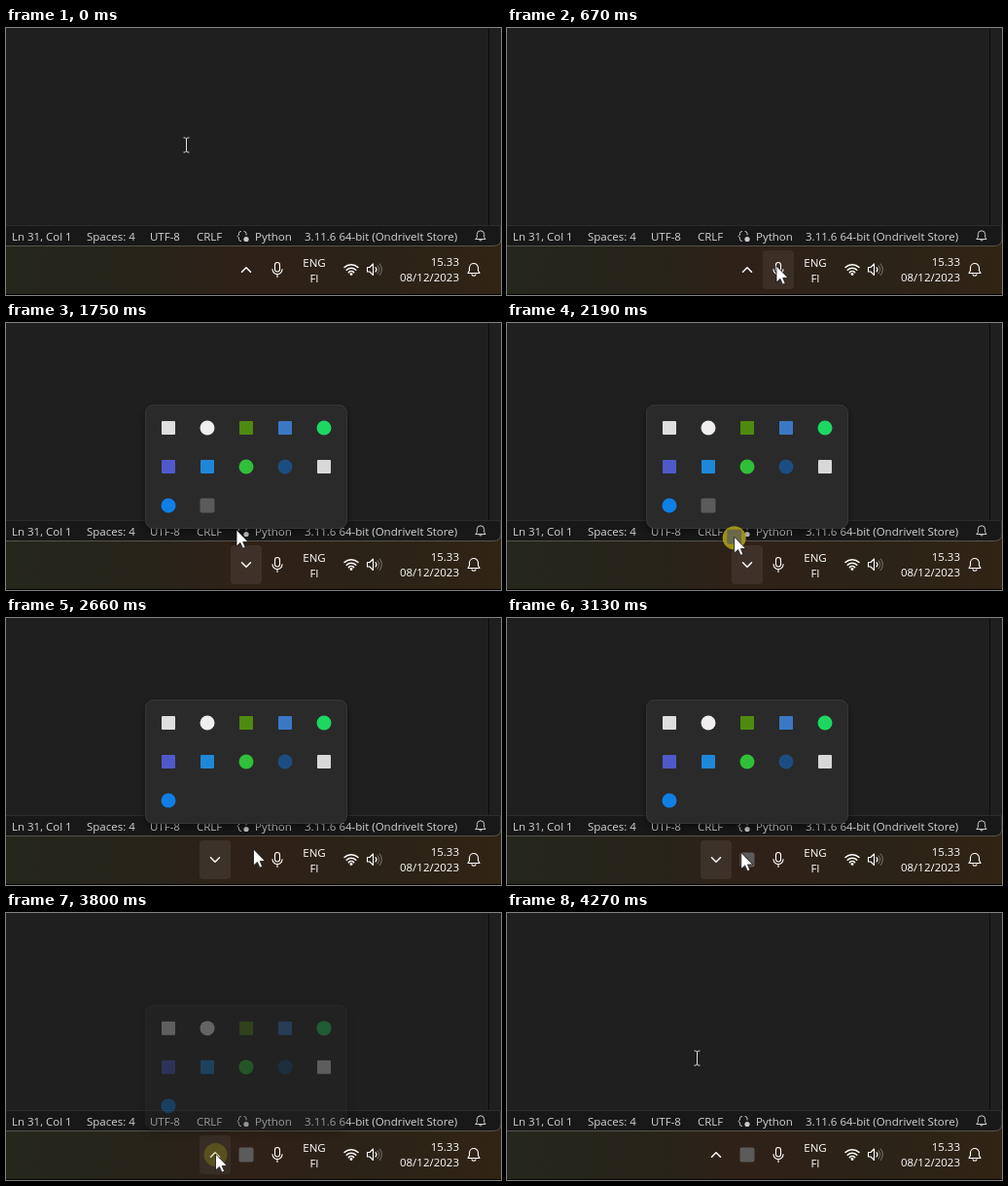
Recreate the animation shown at these times as an HTML page. Size 509 px wide and 275 px high, loop 4.47 s.

```html
<!DOCTYPE html>
<html lang="en">
<head>
<meta charset="utf-8">
<title>Tray icon</title>
<style>
  html, body { margin: 0; width: 100%; height: 100%; overflow: hidden; background: #1f1f1f; }
  svg { display: block; width: 509px; height: 275px; }
  text { font: 11.5px "Open Sans", "Noto Sans", sans-serif; fill: #d4d4d4; white-space: pre; }
  .tray text { fill: #fff; font-weight: 500; }
  .end { text-anchor: end; }
  .mid { text-anchor: middle; }
  .line { fill: none; stroke: #fff; stroke-width: 1.1; stroke-linecap: round; stroke-linejoin: round; }
  .soft { stroke: #ccc; stroke-width: 1; }
  .bold { stroke-width: 1.5; }
</style>
</head>
<body>
<svg viewBox="0 0 509 275">
  <defs>
    <linearGradient id="bar">
      <stop offset="0" stop-color="#25261c"/>
      <stop offset=".3" stop-color="#27241a"/>
      <stop offset=".48" stop-color="#2f2118"/>
      <stop offset=".75" stop-color="#2b2317"/>
      <stop offset="1" stop-color="#302414"/>
    </linearGradient>
    <filter id="shade" x="-15%" y="-15%" width="130%" height="140%">
      <feDropShadow dx="0" dy="4" stdDeviation="4" flood-color="#000" flood-opacity=".45"/>
    </filter>
    <rect id="plate" x="-16" y="-20" width="32" height="40" rx="4" stroke="#fff" stroke-opacity=".04" fill="#fff"/>
    <rect id="app" x="-7.5" y="-7.5" width="15" height="15" rx="2" fill="#5b5b5b"/>
    <path id="ibeam" d="M-3 -7.5H-1L0 -6.5L1 -7.5H3M0 -6.5V6.5M-3 7.5H-1L0 6.5L1 7.5H3"/>
  </defs>

  <!-- editor and status bar -->
  <rect width="509" height="275" fill="url(#bar)"/>
  <rect y="274" width="509" height="1" fill="#000"/>
  <path d="M-1 200H509V217Q509 224.5 501 224.5H-1Z" fill="#181818" stroke="#55544e"/>
  <rect width="509" height="203" fill="#1f1f1f"/>
  <rect x="496" width="1" height="203" fill="#0c0c0c"/>
  <rect y="203" width="509" height="1" fill="#2b2b2b"/>
  <text x="6" y="219">Ln 31, Col 1</text>
  <text x="83" y="219">Spaces: 4</text>
  <text x="148" y="219">UTF-8</text>
  <text x="196" y="219">CRLF</text>
  <text x="256" y="219">Python</text>
  <text x="307" y="219">3.11.6 64-bit (Ondrivelt Store)</text>
  <path class="line soft" d="M241.5 209.5Q239.5 209.5 239.5 211.5V213L238 214.5L239.5 216V217.5Q239.5 219.5 241.5 219.5M245 209.5Q247 209.5 247 211.5V213"/>
  <circle cx="247" cy="217.5" r="2.6" fill="#ccc"/>
  <path class="line soft" d="M483 217.5H493L491.7 215.5V212.5A3.7 3.7 0 0 0 484.3 212.5V215.5ZM486.7 218.2A1.4 1.4 0 0 0 489.3 218.2"/>

  <!-- taskbar -->
  <g class="tray">
    <use id="micPlate" href="#plate" x="279" y="249" opacity=".06"/>
    <g id="chevron">
      <use id="chevPlate" href="#plate"/>
      <path id="arrowhead" class="line bold" d="M-4.5 2.2L0 -2.3L4.5 2.2"/>
    </g>
    <use id="pinned" href="#app" x="247" y="249"/>
    <rect x="276.5" y="241.5" width="5" height="9.5" rx="2.5" class="line"/>
    <path class="line" d="M274 248.5A5 5 0 0 0 284 248.5M279 253.7V256.5"/>
    <text class="mid" x="317" y="246">ENG</text>
    <text class="mid" x="317" y="262">FI</text>
    <path class="line bold" d="M348 246.5A10 10 0 0 1 362 246.5M350.2 249.2A6.9 6.9 0 0 1 359.8 249.2M352.4 251.6A3.7 3.7 0 0 1 357.6 251.6"/>
    <circle cx="355" cy="253.5" r="1.4" fill="#fff"/>
    <path class="line" d="M371.5 246.5H374L377.5 243V254.5L374 251H371.5ZM380 246.6A3.2 3.2 0 0 1 380 251"/>
    <path class="line" opacity=".35" d="M382 244.8A6 6 0 0 1 382 252.8M384.2 243A9 9 0 0 1 384.2 254.5"/>
    <text class="end" x="466" y="245">15.33</text>
    <text class="end" x="466" y="261">08/12/2023</text>
    <path class="line" d="M475 252.5H487L485.5 249.8V247A4.5 4.5 0 0 0 476.5 247V249.8ZM479 253.8A2.1 2.1 0 0 0 483 253.8"/>
  </g>

  <g id="flyout">
    <rect x="143.5" y="84.5" width="207" height="127" rx="8" fill="#2c2c2c" stroke="#363636" filter="url(#shade)"/>
    <g id="apps"></g>
    <use id="stored" href="#app" x="207" y="188"/>
  </g>

  <circle id="press" r="12" fill="#aaa014" fill-opacity=".9"/>
  <use id="ghost" href="#app" opacity=".75"/>
  <path id="pointer" d="M0 0V17L3.9 13.4L6.5 19.2L9.2 18L6.7 12.4H12Z" fill="#fff" stroke="#111" stroke-width=".8"/>
  <g id="beam" fill="none">
    <use href="#ibeam" stroke="#111" stroke-width="2.2"/>
    <use href="#ibeam" stroke="#e8e8e8"/>
  </g>
</svg>
<script>
  const LOOP = 4470, TICK = 1000 / 15;
  const el = Object.fromEntries([...document.querySelectorAll('[id]')].map(n => [n.id, n]));
  const show = (node, on) => { node.style.display = on ? '' : 'none'; };
  const move = (node, x, y) => node.setAttribute('transform', `translate(${x} ${y})`);

  // Overflow icons, row by row: a colour and whether it is round.
  const icons = [
    ['#dedede'], ['#f0eeee', 1], ['#4f8a10'], ['#3b78c4'], ['#1ed760', 1],
    ['#5059c9'], ['#1e88d8'], ['#30bf38', 1], ['#1d4d80', 1], ['#d8d8d8'],
    ['#0f7fe6', 1]
  ];
  el.apps.innerHTML = icons.map(([fill, round], i) => {
    const x = 167 + i % 5 * 40, y = 108 + Math.floor(i / 5) * 40;
    return round
      ? `<circle cx="${x}" cy="${y}" r="7.5" fill="${fill}"/>`
      : `<rect x="${x - 7}" y="${y - 7}" width="14" height="14" rx="1" fill="${fill}"/>`;
  }).join('');

  // Pointer path: tick, x, y
  const path = [
    [0, 185, 120], [2, 185, 120], [10, 277, 245], [14, 277, 245], [20, 262, 249],
    [22, 249, 247], [23, 249, 246], [26, 237, 213], [28, 208, 189], [29, 207, 188],
    [36, 251, 241], [38, 254.5, 238], [45, 254.5, 238], [50, 215.5, 248],
    [57, 215.5, 248], [61, 206, 195], [64, 195, 149], [67, 195, 149]
  ];
  // Pressed spans: first and last tick
  const presses = [[22, 23], [29, 36], [54, 55]];

  const clamp = v => Math.max(0, Math.min(1, v));
  const smooth = v => v * v * (3 - 2 * v);

  function pointerAt(k) {
    const i = Math.max(1, path.findIndex(p => p[0] >= k));
    const [a, ax, ay] = path[i - 1], [b, bx, by] = path[i];
    const raw = clamp((k - a) / (b - a)), u = b - a > 4 ? smooth(raw) : raw;
    return [ax + (bx - ax) * u, ay + (by - ay) * u];
  }

  function draw(t) {
    const k = Math.min(66, Math.floor((t + 12) / TICK));
    const [x, y] = pointerAt(k);
    const open = k >= 23 && k < 56;
    const fly = k < 40 ? clamp((k - 22) / 3) : clamp((58 - k) / 3);

    const inEditor = y < 203 && (k < 20 || k > 58);
    show(el.beam, inEditor);
    show(el.pointer, !inEditor);
    move(el.beam, x + .5, y + .5);
    move(el.pointer, x, y);

    show(el.micPlate, k >= 9 && k < 20);
    show(el.chevPlate, k >= 20 && k < 59);
    el.chevPlate.setAttribute('opacity', open ? .07 : .05);
    move(el.chevron, k < 38 ? 247 : 215, 249);
    el.arrowhead.setAttribute('transform', open ? 'scale(1 -1)' : '');

    show(el.flyout, fly > 0);
    el.flyout.style.opacity = fly;
    move(el.flyout, 0, 24 * (1 - fly) ** 2);
    show(el.stored, k < 38);
    show(el.pinned, k >= 42);

    const glow = Math.max(...presses.map(([a, b]) => k < a ? 0 : clamp(1 - (k - b) / 3)));
    show(el.press, glow > 0);
    el.press.setAttribute('opacity', glow);
    move(el.press, x, y + 1);
    show(el.ghost, k >= 30 && k <= 36);
    move(el.ghost, x, y);
  }

  const start = performance.now();
  function frame() {
    draw((performance.now() - start) % LOOP);
    requestAnimationFrame(frame);
  }
  frame();
</script>
</body>
</html>
```
